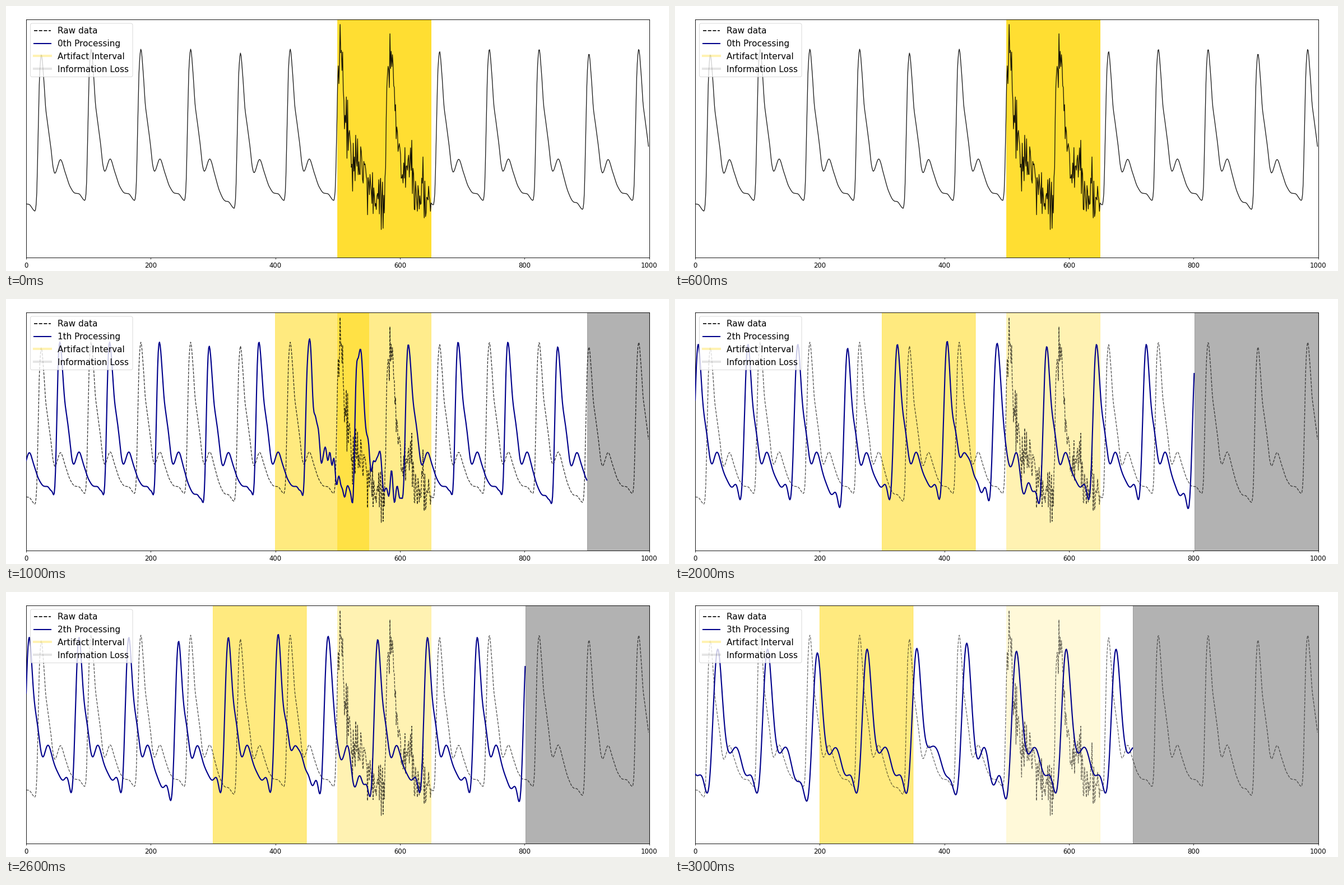
A matplotlib script that plays this animation: 1183 px wide and 473 px high, repeating every 4000 ms.

```python
import numpy as np
import matplotlib.pyplot as plt
from matplotlib.animation import FuncAnimation
from matplotlib.patches import FancyBboxPatch

W, H = 1183, 473
LEFT, RIGHT, TOP, BOTTOM = 36, 1147.5, 24, 449.5
DPI = 72  # one point equals one pixel
plt.rcParams["font.family"] = "DejaVu Sans"

SAMPLES, PAD = 1000, 160
PERIOD, FIRST_PEAK, FOOT = 79.92, 24.3, -10
ARTIFACT_START, ARTIFACT_LENGTH = 500, 150

# One pulse: samples after the peak, height on the stage
PULSE = ((FOOT, 347), (-8, 333), (-4.5, 185), (-2.7, 109), (0, 77), (3.8, 120),
         (7.2, 177), (10, 201), (15.2, 246), (19.3, 286), (21.8, 295), (30.6, 273),
         (38, 296), (46.5, 323), (54, 334), (60, 335), (PERIOD + FOOT, 347))
# Beats that start from a deeper foot
SAG = {0: 19, 4: 14, 8: 8, 11: 16}


def smooth(x, knots):
    """Monotone cubic curve through the knots."""
    kx, ky = np.array(knots, float).T
    h = np.diff(kx)
    d = np.diff(ky) / h
    same = d[:-1] * d[1:] > 0
    m = np.zeros_like(kx)
    m[1:-1][same] = (2 * d[:-1] * d[1:])[same] / (d[:-1] + d[1:])[same]
    i = np.clip(np.searchsorted(kx, x) - 1, 0, len(h) - 1)
    t = (x - kx[i]) / h[i]
    return (ky[i] * (1 + 2 * t) * (1 - t) ** 2 + ky[i + 1] * t * t * (3 - 2 * t)
            + h[i] * (m[i] * t * (1 - t) ** 2 + m[i + 1] * t * t * (t - 1)))


def make_signal():
    v = np.arange(-PAD, SAMPLES + PAD + 40)
    y = smooth((v - FIRST_PEAK - FOOT) % PERIOD + FOOT, PULSE)

    for beat, depth in SAG.items():
        foot = FIRST_PEAK + FOOT + beat * PERIOD
        y += np.interp(v, foot + np.array([-35, -14, 0, 10, 45]),
                       depth * np.array([0, 1, 1, .5, 0]))

    dirty = (v >= ARTIFACT_START) & (v < ARTIFACT_START + ARTIFACT_LENGTH)
    y[dirty] += np.random.default_rng(4).normal(0, 27, dirty.sum())
    return y


def low_pass(y, cutoff):
    freq = np.fft.rfftfreq(len(y))
    return np.fft.irfft(np.fft.rfft(y) / (1 + (freq / cutoff) ** 10), len(y))


SIGNAL = make_signal()


def processed(step):
    """Each pass smooths more, moves the signal earlier and loses its end."""
    start = PAD + 50 * step
    return low_pass(SIGNAL, .15 / step)[start:start + SAMPLES - 99 * step]


def px(sample):
    return LEFT + sample * (RIGHT - LEFT) / SAMPLES


fig = plt.figure(figsize=((W + 1e-6) / DPI, (H + 1e-6) / DPI), dpi=DPI, facecolor="white")
ax = fig.add_axes([LEFT / W, 1 - BOTTOM / H, (RIGHT - LEFT) / W, (BOTTOM - TOP) / H])


def span(start, end, color, alpha):
    ax.axvspan(px(start), px(end), color=color, alpha=alpha, lw=.8, snap=False)


def curve(y, **style):
    ax.plot(px(np.arange(len(y))), y, **style)


def legend(step):
    ax.add_patch(FancyBboxPatch((43.5, 31), 182.5, 95.5,
                                boxstyle="round,pad=0,rounding_size=3",
                                fc="white", ec="0.8", lw=.9, alpha=.8, zorder=5))
    entries = (("Raw data", dict(color="black", lw=1.64, ls="--")),
               (f"{step}th Processing", dict(color="darkblue", lw=2.05)),
               ("Artifact Interval", dict(color="gold", lw=4.1, alpha=.3)),
               ("Information Loss", dict(color="black", lw=4.1, alpha=.1)))
    for row, (label, style) in enumerate(entries):
        y = 43.8 + 22.8 * row
        ax.plot([49.5, 80.3], [y, y], zorder=6, **style)
        ax.text(92, y + 5.4, label, fontsize=15.25, va="baseline", zorder=6)


def draw(step):
    ax.clear()
    ax.set(xlim=(LEFT, RIGHT), ylim=(BOTTOM, TOP), yticks=[])
    ticks = range(0, SAMPLES + 1, 200)
    ax.set_xticks([px(t) for t in ticks], [str(t) for t in ticks])
    ax.tick_params(axis="x", length=3, width=.8, pad=4, labelsize=11.6)
    for spine in ax.spines.values():
        spine.set_linewidth(.9)

    # The raw interval fades while its processed copy moves left
    for start, alpha in ((ARTIFACT_START, .6 - .15 * step),
                         (ARTIFACT_START - 100 * step, .5)):
        span(start, start + ARTIFACT_LENGTH, "gold", alpha)
    if step:
        span(SAMPLES - 99 * step, SAMPLES, "black", .3)
        curve(processed(step), color="darkblue", lw=2.1, zorder=3)
    curve(SIGNAL[PAD:PAD + SAMPLES], color="black", lw=1.3, alpha=.9 - .11 * step,
          ls="--" if step else "-", zorder=2)
    legend(step)


anim = FuncAnimation(fig, draw, frames=4, init_func=lambda: draw(0),
                     interval=1000, repeat=True, repeat_delay=0)
plt.show()
```
